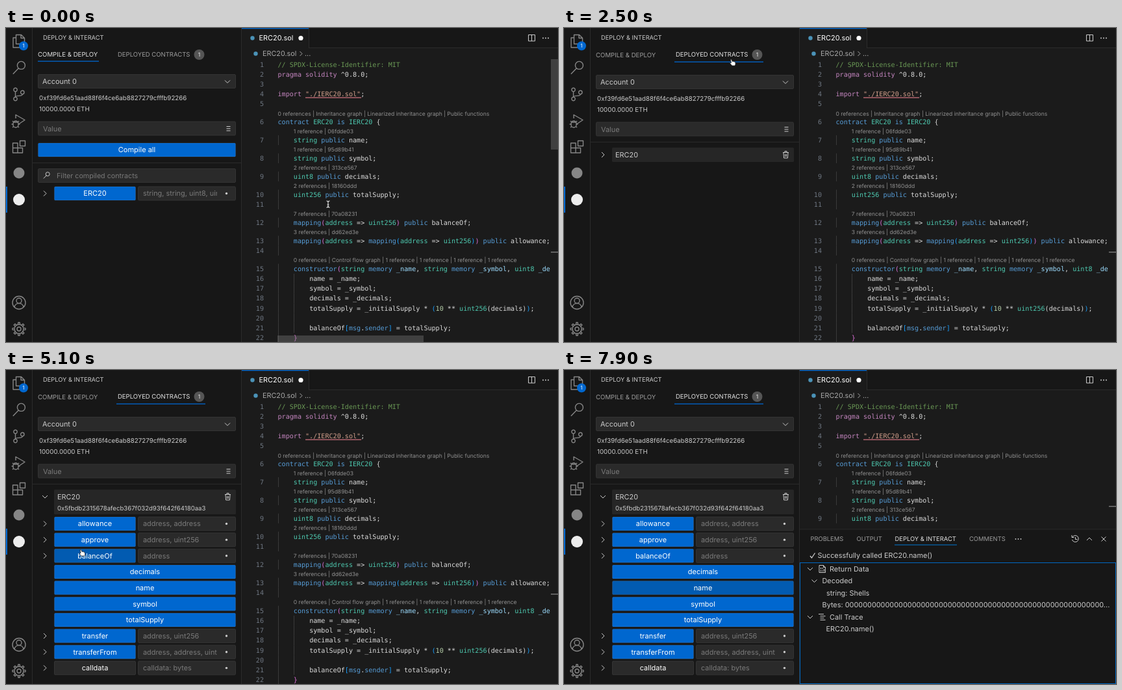
Recreate the animation shown at these times as an HTML page. Size 850x483 px, loop 8 s.

```html
<!DOCTYPE html>
<html lang="en">
<head>
<meta charset="utf-8">
<title>Deploy and interact</title>
<style>
html, body { margin: 0; width: 100%; height: 100%; overflow: hidden; background: #171717; }
svg { display: block; }
text {
  font-family: Inter, "Open Sans", sans-serif;
  font-variant-ligatures: none;
  text-rendering: geometricPrecision;
  white-space: pre;
}
.mono { font-family: "DejaVu Sans Mono", monospace; }
</style>
</head>
<body>
<svg id="stage" width="850" height="483"></svg>
<script>
const BLUE = '#0067cf', HOVER = '#025bb1', EDITOR = '#1b1b1b', SIDE = '#171717';
const LINE = '#2b2b2b', FIELD = '#2a2a2a', TEXT = '#cccccc';

// Text is placed by the middle of its capitals.
const text = (x, y, str, size = 10.9, fill = TEXT, attrs = '') =>
  `<text x="${x}" y="${y + size * .36}" font-size="${size}" fill="${fill}" ${attrs}>${str}</text>`;
const centred = (x, y, str, size, fill) => text(x, y, str, size, fill, 'text-anchor="middle"');
const rect = (x, y, w, h, fill, attrs = '') =>
  `<rect x="${x}" y="${y}" width="${w}" height="${h}" fill="${fill}" ${attrs}/>`;
const dot = (x, y, r, fill) => `<circle cx="${x}" cy="${y}" r="${r}" fill="${fill}"/>`;
const path = (d, stroke = TEXT, w = 1, attrs = '') =>
  `<path d="${d}" fill="none" stroke="${stroke}" stroke-width="${w}" stroke-linejoin="round" ${attrs}/>`;
const group = (id, body, attrs = '') => `<g id="${id}" ${attrs}>${body}</g>`;
const right = (x, y, attrs) => path(`M${x - 2} ${y - 4}l4 4-4 4`, TEXT, 1, attrs);
const down = (x, y, attrs) => path(`M${x - 4} ${y - 2}l4 4 4-4`, TEXT, 1, attrs);
const field = (x, y, w, h = 22) =>
  rect(x + .5, y + .5, w - 1, h - 1, FIELD, 'rx="1.5" stroke="#343434"');
const button = (x, y, w, label, fill = BLUE, attrs = '') =>
  rect(x + .5, y - 10.5, w - 1, 21, fill, 'rx="1.5" stroke="#fff" stroke-opacity=".09" ' + attrs) +
  centred(x + w / 2, y, label, 11, '#fff');
const magnifier = (x, y, s, color, w) =>
  path(`M${x + 7 * s} ${y - 3 * s}a${5 * s} ${5 * s} 0 1 0-${10 * s} 0a${5 * s} ${5 * s} 0 1 0 ${10 * s} 0M${x - 1.5 * s} ${y + .8 * s}l-${7 * s} ${7.4 * s}`, color, w);
const argument = (y, str) => field(203, y - 11, 151) +
  `<g clip-path="url(#args)">${text(211, y, str, 10.9, '#7a7a7a')}</g>` + dot(339.5, y, 1.7, TEXT);

function activityBar() {
  const c = '#868686', icon = d => path(d, c, 1.4);
  let teeth = '';
  for (let i = 0; i < 8; i++)
    teeth += path('M18.4 455.6l.5-2.6h2.2l.5 2.6', c, 1.4, `transform="rotate(${i * 45} 20 463)"`);
  return rect(40, 0, 1, 483, LINE) +
    icon('M15.5 24.5v-14h8l5 5v9zM23 10.5v5h5M15 15h-4v15h11v-5') +
    dot(27, 27.5, 7, BLUE) + centred(27, 27.5, '1', 8, '#fff') +
    magnifier(21, 61, 1.2, c, 1.4) +
    icon('M17.2 95a2.7 2.7 0 1 0-5.4 0a2.7 2.7 0 1 0 5.4 0M17.2 109a2.7 2.7 0 1 0-5.4 0a2.7 2.7 0 1 0 5.4 0M28 99a2.7 2.7 0 1 0-5.4 0a2.7 2.7 0 1 0 5.4 0M14.5 98v8M25.3 102c0 4-10.8 1-10.8 4') +
    icon('M15 139v-5.500l14 8-9 6M19 147a4 4 0 1 0-8 0v2a4 4 0 1 0 8 0zM11 145h8M10 143l2 2M20 143l-2 2M8.500 148h2.500M19 148h2.500M10 153l2-2M20 153l-2-2') +
    icon('M10.500 177h7.500v15h-7.500zM10.500 184.500h15v7.500h-15zM21.500 173.500h8v8h-8z') +
    dot(20, 223, 8.5, c) + dot(20, 264, 9, '#ededed') + rect(0, 244, 2, 40, BLUE) +
    icon('M30 422.500a10 10 0 1 0-20 0a10 10 0 1 0 20 0M24 419.500a4 4 0 1 0-8 0a4 4 0 1 0 8 0M13 429.500c1-8 13-8 14 0') +
    icon('M27 463a7 7 0 1 0-14 0a7 7 0 1 0 14 0M23 463a3 3 0 1 0-6 0a3 3 0 1 0 6 0') + teeth;
}

const calls = [['allowance', 'address, address'], ['approve', 'address, uint256'], ['balanceOf', 'address'],
  ['decimals'], ['name'], ['symbol'], ['totalSupply'],
  ['transfer', 'address, uint256'], ['transferFrom', 'address, address, uint'], ['calldata', 'calldata: bytes']];
const rowY = i => 236.5 + i * 24.65;

function sidebar() {
  const account = field(49, 71, 305) + text(56, 82.5, 'Account 0') + down(341, 82.5) +
    text(51, 107, '0xf39fd6e51aad88f6f4ce6ab8827279cfffb92266', 9.75) +
    text(51, 124.5, '10000.0000 ETH', 9.75) +
    field(49, 143.5, 305) + text(57, 155, 'Value', 10.9, '#7a7a7a') +
    path('M339.500 151.500h6M339.500 154.800h6M339.500 158h6');
  const compile = rect(49, 50.5, 94, 1.3, BLUE) + button(49, 187.5, 305, 'Compile all') +
    rect(41, 207, 321, 1, LINE) + field(49, 216, 305) + magnifier(63, 226.5, .6, TEXT, 1) +
    text(78, 227.5, 'Filter compiled contracts', 10.7, '#7a7a7a') +
    right(60, 254.5) + button(74, 254.5, 126, 'ERC20') + argument(254.5, 'string, string, uint8, uint256');
  const trash = path('M337 191.500h9M340 191.500v-2h3v2M338 192l.6 8h5.800l.6-8M340.500 194v4M342.500 194v4');
  const rows = calls.map(([name, args], i) => {
    const y = rowY(i), fill = name == 'calldata' ? FIELD : BLUE;
    return args ? right(60, y) + button(74, y, 126, name, fill, `id="call${i}"`) + argument(y, args)
      : button(74, y, 280, name, fill, `id="call${i}"`);
  }).join('');
  const deployed = rect(170, 51.5, 137, 1.3, BLUE) + rect(41, 175, 321, 1, LINE) +
    rect(74, 184, 280, 22, '#262626', 'id="card" rx="1.5"') + text(79, 195, 'ERC20') + trash +
    right(60, 195, 'id="closed"') + group('expanded', down(60, 195, 'id="opened"') +
      text(79, 213, '0x5fbdb2315678afecb367f032d93f642f64180aa3', 9.6) + rows);
  return rect(362, 0, 1, 483, LINE) + text(57, 15, 'DEPLOY & INTERACT', 9.3) +
    text(49, 40.5, 'COMPILE & DEPLOY', 9.65, '#e4e4e4', 'id="tab1"') +
    text(172, 40.5, 'DEPLOYED CONTRACTS', 9.5, '#9d9d9d', 'id="tab2"') +
    dot(297.5, 41, 8, '#555') + centred(297.5, 41, '1', 8.6, '#eee') +
    group('account', account) + group('compile', compile) + group('deployed', deployed);
}

// A line with ~ is a note above the next line; a single dot is an empty line.
const source = `// SPDX-License-Identifier: MIT
pragma solidity ^0.8.0;
.
import "./IERC20.sol";
.
~0 references | Inheritance graph | Linearized inheritance graph | Public functions
contract ERC20 is IERC20 {
~1 reference | 06fdde03
    string public name;
~1 reference | 95d89b41
    string public symbol;
~2 references | 313ce567
    uint8 public decimals;
~2 references | 18160ddd
    uint256 public totalSupply;
.
~7 references | 70a08231
    mapping(address => uint256) public balanceOf;
~3 references | dd62ed3e
    mapping(address => mapping(address => uint256)) public allowance;
.
~0 references | Control flow graph | 1 reference | 1 reference | 1 reference | 1 reference
    constructor(string memory _name, string memory _symbol, uint8 _decimals) {
        name = _name;
        symbol = _symbol;
        decimals = _decimals;
        totalSupply = _initialSupply * (10 ** uint256(decimals));
.
        balanceOf[msg.sender] = totalSupply;
    }`.split('\n');

const palette = {
  '#c586c0': 'pragma solidity import',
  '#569cd6': 'contract is public mapping constructor memory msg sender',
  '#4ec9b0': 'ERC20 IERC20 string uint8 uint256 address'
};
const wordColor = {};
for (const c in palette) for (const w of palette[c].split(' ')) wordColor[w] = c;
const brackets = ['#d4d4d4', '#da70d6', '#179fff'];
let depth = 0;

function tokenColor(t, line) {
  if (t.startsWith('//')) return '#6a9955';
  if (t[0] == '"') return '#d3a08c';
  if ('([{'.includes(t)) return brackets[depth++ % 3];
  if (')]}'.includes(t)) return brackets[--depth % 3];
  if (t[0] == '_' && line.startsWith('constructor')) return '#9cdcfe';
  return /^\d\d+$/.test(t) ? '#b5cea8' : wordColor[t];
}
const highlight = line => line.replace(/\/\/.*|"[^"]*"|\w+|[()[\]{}]/g, t => {
  const c = tokenColor(t, line);
  return c ? `<tspan fill="${c}">${t}</tspan>` : t;
});

function code() {
  let y = 56, number = 0, out = '';
  source.forEach((line, i) => {
    const isLens = line[0] == '~';
    const indent = (isLens ? source[i + 1] : line).search(/\S/);
    const x = 418.5 + indent * 6.08;
    if (isLens) {
      out += text(x, y - .4, line.slice(1), 8.55, '#909090');
      y += 12.72;
      return;
    }
    out += text(397, y, ++number, 10.1, '#6e7681', 'class="mono" text-anchor="end"');
    if (number > 6) out += rect(419, y - 7.6, 1, 15.2, '#3a3a3a');
    if (number > 15 && number < 22) out += rect(443, y - 7.6, 1, 15.2, '#3a3a3a');
    if (line != '.') out += text(x, y, highlight(line.trim()), 10.1, '#dcdcdc', 'class="mono"');
    y += 15.18;
  });
  return out + rect(461, 106.5, 86, 1.3, '#c9707c');
}

function editor() {
  return rect(363, 0, 487, 483, EDITOR) + rect(466, 0, 384, 30, SIDE) +
    rect(466, 30, 384, 1, LINE) + rect(466, 0, 1, 30, LINE) + rect(363, 0, 103, 1.3, BLUE) +
    dot(379.5, 15.5, 3.2, '#4b93b8') + text(389.5, 15.5, 'ERC20.sol', 10.9, '#fff') + dot(454, 15.5, 3.6, '#fff') +
    path('M804.500 10.500h10v9.500h-10zM809.500 10.500v9.500') +
    [827, 831, 835].map(x => dot(x, 15.5, 1, TEXT)).join('') +
    dot(384.5, 39.5, 3.2, '#4b93b8') + text(395, 39.5, 'ERC20.sol', 10.8, '#a9a9a9') +
    path('M452.500 36l3.500 3.500-3.500 3.500', '#a9a9a9') + text(460, 39.5, '...', 10.8, '#a9a9a9') +
    `<g clip-path="url(#codeArea)">${code()}</g>` +
    rect(418, 473, 225, 10, '#797979', 'id="hbar" fill-opacity=".4"');
}

function panel() {
  const tab = (x, str, c = '#9d9d9d') => text(x, 260, str, 9.4, c);
  return rect(363, 236, 476, 9, EDITOR) + rect(363, 245, 487, 238, SIDE) + rect(363, 244.5, 487, 1, LINE) +
    tab(379.5, 'PROBLEMS') + tab(450.5, 'OUTPUT') + tab(509.5, 'DEPLOY & INTERACT', '#e4e4e4') +
    tab(624, 'COMMENTS') + rect(509, 268.5, 96, 1, '#0078d4') +
    [695.5, 699.5, 703.5].map(x => dot(x, 260, .9, TEXT)).join('') +
    path('M783 257a5 5 0 1 1-.5 4M782 254v3.500h3.500M787.500 257v3.500h3') +
    path('M805 262l4-4 4 4M827.500 256.500l7 7M834.500 256.500l-7 7') +
    path('M379 286l2.500 3 5-7.500', TEXT, 1.3) + text(390.5, 285.5, 'Successfully called ERC20.name()') +
    rect(363.5, 296.5, 486, 186, 'none', 'stroke="#0069c4"') +
    down(379, 306) + path('M393 300.500h6.500l3 3v8h-9.500zM399.500 300.500v3h3M395.500 304v2.500M398 304v2.500M395.500 308v2M398 308v2M400.500 306v4') +
    text(409, 306, 'Return Data') + down(385.5, 324.5) + text(397.5, 324.5, 'Decoded') +
    text(404, 343, 'string: Shells') + text(397.5, 361.5, 'Bytes: ' + '0'.repeat(58) + '...') +
    down(379, 380) + path('M392 375.500h8M394.500 378.500h8M394.500 381.500h6M394.500 384.500h8') +
    text(409, 380, 'Call Trace') + text(403.5, 398.5, 'ERC20.name()');
}

const cursor =
  group('beam', path('M-2.500-5q2.500 0 2.500 2v6q0 2-2.500 2M2.500-5q-2.500 0-2.500 2v6q0 2 2.500 2M-1.500 1h3', '#e8e8e8', 1.1)) +
  group('arrow', '<path d="M-3-5v10l2.500-2.300 1.600 3.600 1.800-.8-1.600-3.500h3.400z" fill="#000" stroke="#fff" stroke-width=".9"/>') +
  group('hand', '<path d="M-2.500-4.500q1.200-.8 1.800.5l1 2.500q1-.8 1.700.2q1-.6 1.500.4q1.200-.3 1.400 1l.2 2.400-.8 2.500h-4.600l-3-3.700q-.2-1.500 1.300-.8l.5.3z" fill="#fff" stroke="#222" stroke-width=".8"/>');

document.getElementById('stage').innerHTML =
  `<defs><clipPath id="args">${rect(203, 0, 122, 483, '#fff')}</clipPath>
   <clipPath id="codeArea">${rect(363, 46, 476, 437, '#fff')}</clipPath></defs>` +
  rect(0, 0, 850, 483, SIDE) + activityBar() + sidebar() + editor() + group('panel', panel()) +
  rect(839, 48, 11, 139, '#797979', 'id="vbar" fill-opacity=".4"') +
  rect(839, 344, 11, 1.5, '#777', 'id="mark"') + group('cursor', cursor);

const $ = id => document.getElementById(id);
const show = (id, on) => $(id).setAttribute('visibility', on ? 'inherit' : 'hidden');
const set = (id, name, value) => $(id).setAttribute(name, value);
const clamp = v => Math.max(0, Math.min(1, v));

// time, x, y
const route = [[0, 496, 271], [150, 496, 271], [1150, 270, 46], [1500, 266, 49], [2050, 260, 52], [2500, 259, 53],
  [2800, 259, 53], [3500, 60, 202], [4700, 60, 202], [5400, 153, 332], [5800, 153, 332], [6600, 155, 333], [8000, 155, 333]];

function pointer(t) {
  const i = route.findIndex(p => p[0] > t), a = route[i - 1], b = route[i];
  const u = (t - a[0]) / (b[0] - a[0]), k = u * u * (3 - 2 * u);
  return [a[1] + (b[1] - a[1]) * k, a[2] + (b[2] - a[2]) * k];
}

function draw(now) {
  const t = now % 8000, [x, y] = pointer(t);
  const second = t >= 2000, open = t >= 3700, called = t >= 6500;
  const onTab = x > 168 && x < 308 && y > 30 && y < 56;
  const onToggle = second && x > 52 && x < 68 && Math.abs(y - 197) < 12;
  const shift = `translate(0 ${second ? 1 : 0})`;

  show('compile', !second);
  show('deployed', second);
  show('closed', !open);
  show('expanded', open);
  set('account', 'transform', shift);
  set('tab1', 'transform', shift);
  set('tab1', 'fill', second ? '#9d9d9d' : '#e4e4e4');
  set('tab2', 'fill', second || onTab ? '#e4e4e4' : '#9d9d9d');
  set('card', 'height', open ? 38 : 22);
  for (const id of ['closed', 'opened']) set(id, 'stroke', onToggle ? '#0078d4' : TEXT);
  if (open) show('closed', false);

  let onCall = false;
  calls.forEach(([name, args], i) => {
    const over = open && x > 74 && x < (args ? 200 : 354) && Math.abs(y - rowY(i)) < 11;
    onCall = onCall || over;
    if (name != 'calldata') set('call' + i, 'fill', over ? HOVER : BLUE);
  });
  if (!second) show('closed', false);

  show('panel', called);
  const fade = clamp((1400 - t) / 700);
  set('hbar', 'opacity', fade);
  set('vbar', 'opacity', called ? clamp((7800 - t) / 800) : fade);
  set('vbar', 'height', called ? 34 : 139);
  set('mark', 'y', called ? 209 : 344);

  const hand = onTab || onToggle || onCall;
  set('cursor', 'transform', `translate(${x} ${y})`);
  show('cursor', t < 7300);
  // Parts of a hidden group stay hidden because they inherit.
  show('beam', x > 362);
  show('hand', x <= 362 && hand);
  show('arrow', x <= 362 && !hand);
}

const start = performance.now();
function tick() {
  draw(performance.now() - start);
  requestAnimationFrame(tick);
}
tick();
</script>
</body>
</html>
```
